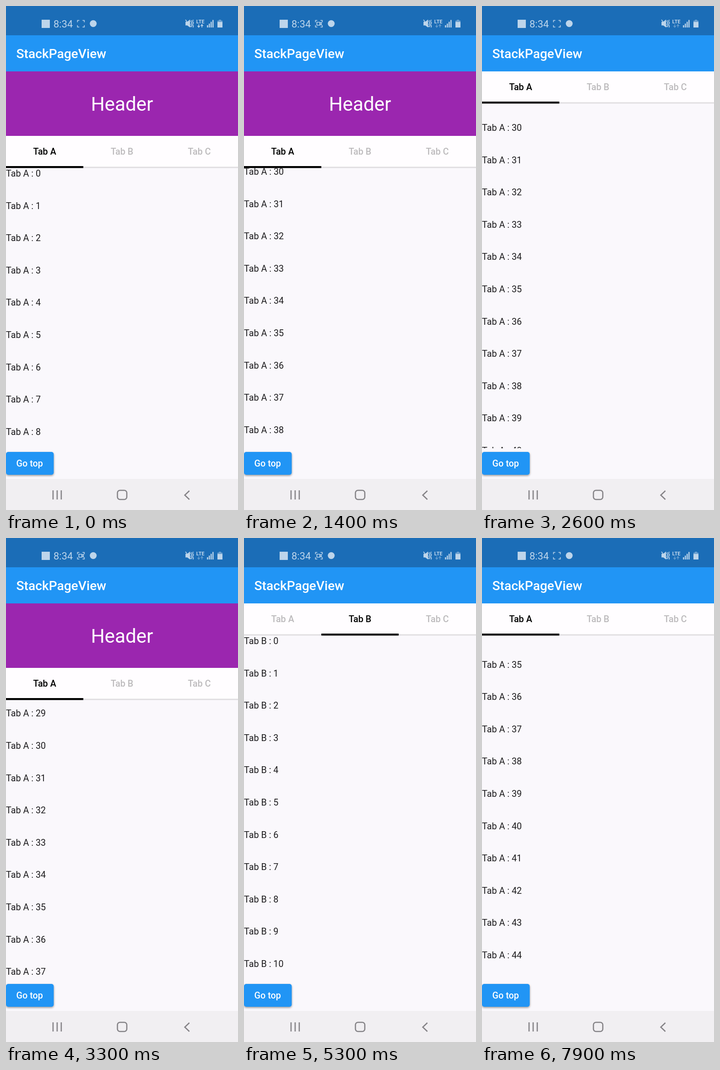
Recreate the animation shown at these times as an HTML page. Size 508 by 1102 pixels, loop 8000 ms.

```html
<!DOCTYPE html>
<html lang="en">
<head>
<meta charset="utf-8">
<title>StackPageView</title>
<style>
  html, body { margin: 0; width: 100%; height: 100%; overflow: hidden; background: #faf8fc; }
  svg { display: block; width: 508px; height: 1102px; font: 19.76px Roboto, sans-serif; fill: #1d1c1e; }
  .medium { font-weight: 500; }
  .mid { text-anchor: middle; }
  .status { fill: #bdd5eb; }
  .line { fill: none; stroke: #bdd5eb; stroke-width: 1.6; }
  .nav { fill: none; stroke: #858387; stroke-width: 2.6; }
  #button { filter: drop-shadow(0 2px 2px #0006); }
</style>
</head>
<body>
<svg viewBox="0 0 508 1102">
  <defs><clipPath id="body"><rect y="143" width="508" height="824"/></clipPath></defs>
  <rect width="508" height="1102" fill="#faf8fc"/>
  <g id="lists" clip-path="url(#body)"></g>

  <g id="top">
    <rect y="142" width="508" height="142" fill="#9b26af"/>
    <text class="mid" x="254" y="229" font-size="42.3" fill="#fff">Header</text>
    <rect y="284" width="508" height="70" fill="#fffdff"/>
    <rect y="351.5" width="508" height="2.8" fill="#dfdde0"/>
    <g id="labels" class="medium mid" fill="#000"></g>
    <rect id="mark" y="350" width="169.3" height="4.3" fill="#000"/>
  </g>

  <rect y="64" width="508" height="79" fill="#2195f5"/>
  <text class="medium" x="22.6" y="114" font-size="28.2" fill="#fff">StackPageView</text>

  <rect width="508" height="64" fill="#1b6db7"/>
  <g class="status">
    <rect x="78" y="30" width="18" height="18"/>
    <text x="104" y="47" font-size="22">8:34</text>
    <path class="line" d="M156.500 35.500V31.500H160.500M167.500 31.500H171.500V35.500M171.500 42V46H167.500M160.500 46H156.500V42"/>
    <path id="camera" class="line" d="M159.500 35.500H166V42H159.500ZM166 38L169.500 36V41.500L166 39.500"/>
    <circle cx="191" cy="38.500" r="7.500"/>
    <path d="M393 34.500H397L403 29.500V47L397 42.500H393Z"/>
    <path class="line" d="M393 30L405 46" stroke-width="1.800"/>
    <path class="line" d="M406 31L405 34L407 37L405 40L407 43L406 46M410 30L408.500 33.500L410.500 37L408.500 40.500L410.500 44L409.500 47"/>
    <text class="mid" x="425.500" y="38" font-size="11" font-weight="700">LTE</text>
    <path id="arrows" class="line" d="M422 40V46M419.500 43.500L422 46.500L424.500 43.500M429 47V41M426.500 43.500L429 40.500L431.500 43.500"/>
    <path d="M440 42h2.500v5h-2.500zM444 38.500h2.500v8.500h-2.500zM448 34.500h2.500v12.500h-2.500zM452 30.500h2.500v16.500h-2.500z"/>
    <path d="M466 30h5v2h3v4h-11v-4h3z" opacity=".5"/>
    <rect x="463" y="35" width="11" height="12"/>
  </g>

  <rect id="button" y="975" width="104.500" height="50" rx="5" fill="#2195f5"/>
  <text class="medium" x="22.600" y="1007" fill="#fff">Go top</text>

  <rect y="1034" width="508" height="68" fill="#f1eff2"/>
  <path class="nav" d="M103 1059V1079M112 1059V1079M121 1059V1079M401.500 1060L391.500 1069.500L401.500 1079"/>
  <rect class="nav" x="244" y="1059" width="20.500" height="20" rx="5.500"/>
</svg>
<script>
const $ = id => document.getElementById(id);
const LOOP = 8000, STEP = 100, WIDTH = 508, PITCH = 70.6, COUNT = 50;

function add(parent, tag, attrs, text = '') {
  const el = document.createElementNS('http://www.w3.org/2000/svg', tag);
  for (const key in attrs) el.setAttribute(key, attrs[key]);
  el.textContent = text;
  return parent.appendChild(el);
}

const pages = [...'ABC'].map((name, i) => {
  const label = add($('labels'), 'text', { x: WIDTH * (i + .5) / 3, y: 324.5 }, 'Tab ' + name);
  const list = add($('lists'), 'g', {});
  for (let n = 0; n < COUNT; n++)
    add(list, 'text', { x: 0, y: 373 + n * PITCH }, `Tab ${name} : ${n}`);
  return { label, list };
});

// Keys are [time, value]; each move eases out.
function track(keys, t) {
  const next = keys.findIndex(k => k[0] > t);
  if (next < 0) return keys.at(-1)[1];
  if (!next) return keys[0][1];
  const [t0, a] = keys[next - 1], [t1, b] = keys[next];
  return a + (b - a) * (1 - (1 - (t - t0) / (t1 - t0)) ** 2);
}

const collapse = [[100, 0], [400, 141], [1000, 141], [1300, 0], [1800, 0],
  [2200, 141], [2700, 141], [3000, 0], [3500, 0], [3800, 141]];
const scrolls = [
  [[200, 0], [1000, 2122], [1400, 2122], [1700, 2077], [3000, 2077], [3300, 2030],
    [3700, 2030], [4300, 2418.5], [4400, 2419.5]],
  [[5400, 0], [6400, 1983]],
  [[0, 0]]
];
const swipe = [[4700, 0], [5200, 1], [7100, 1], [7600, 0]];

function draw(now) {
  const t = Math.floor(now % LOOP / STEP) * STEP;
  const up = track(collapse, t), page = track(swipe, t);
  const move = (el, x, y) => el.setAttribute('transform', `translate(${x} ${y})`);
  move($('top'), 0, -up);
  move($('mark'), page * WIDTH / 3, 0);
  pages.forEach(({ label, list }, i) => {
    move(list, (i - page) * WIDTH, -up - track(scrolls[i], t));
    label.setAttribute('opacity', .26 + .74 * Math.max(0, 1 - Math.abs(i - page)));
  });
  const blink = t % 1000;
  $('camera').setAttribute('opacity', blink >= 100 && blink < 600 ? 1 : 0);
  $('arrows').setAttribute('opacity', t < 200 ? 1 : .45);
}

let start;
function frame(now) {
  start ??= now;
  draw(now - start);
  requestAnimationFrame(frame);
}
draw(0);
requestAnimationFrame(frame);
</script>
</body>
</html>
```
